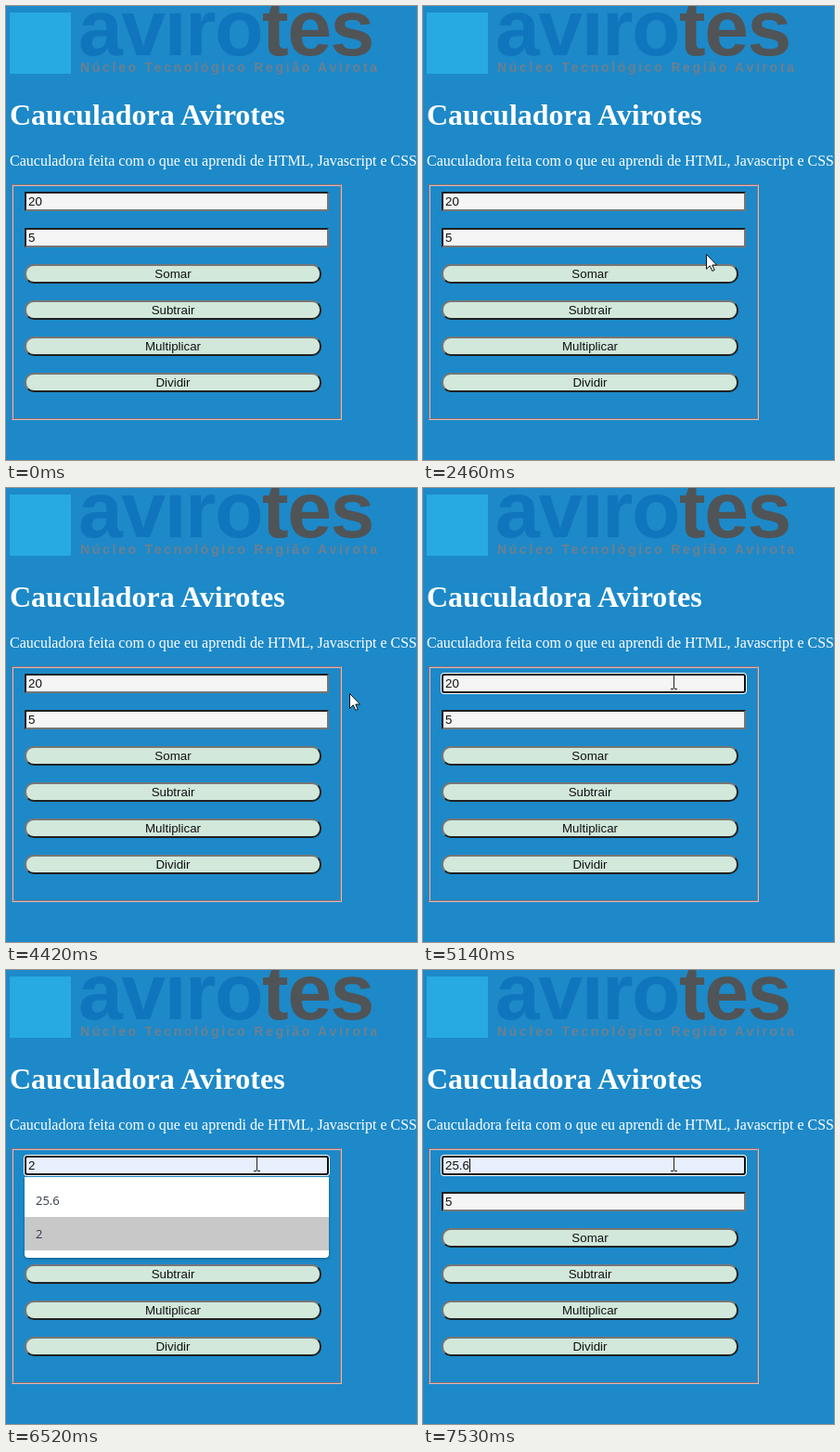
An HTML page that plays this animation: 443 px wide and 489 px high, repeating every 8 s.

```html
<!DOCTYPE html>
<html lang="pt">
<head>
<meta charset="utf-8">
<title>Cauculadora</title>
<style>
  html, body { margin: 0; width: 100%; height: 100%; overflow: hidden; background: #1d89c8; }
  #stage { position: relative; width: 443px; height: 489px; overflow: hidden; background: #1d89c8; }
  #stage div, #stage svg { position: absolute; box-sizing: border-box; white-space: pre; }
  .badge { left: 4px; top: 7px; width: 66px; height: 66px; background: #27a9e1; }
  .brand { left: 78px; top: -25px; color: #0f76bd; letter-spacing: -1.5px;
    font: bold 86px/96px "Liberation Sans", Arial, sans-serif; }
  .brand span { color: #505456; }
  .tagline { left: 80px; top: 58px; color: #6d7f8f; letter-spacing: 2.7px;
    font: bold 14px/17px "Liberation Sans", Arial, sans-serif; }
  .title { left: 4px; top: 99px; color: #fff; font: bold 32px/36px "Liberation Serif", "Times New Roman", serif; }
  .intro { left: 4px; top: 158px; color: #fff; font: 16px/18px "Liberation Serif", "Times New Roman", serif; }
  .form { left: 6px; top: 192px; width: 356px; height: 254px; border: 2px groove #e0b8bc; }
  .field, .button { left: 20px; height: 21px; color: #111;
    font: 13.333px/15px "Liberation Sans", Arial, sans-serif; }
  .field { width: 328px; padding: 1px 2px; border: 2px inset #767676; background: #f5f5f5; }
  .field.focus { border: 2px solid #101010; border-radius: 3px; box-shadow: 0 0 0 1px #fff; }
  .field.filled { background: #e8f0fe; }
  .button { width: 320px; padding: 1px; border: 2px outset #767676; border-radius: 10px;
    background: #d1e8db; text-align: center; }
  #caret { top: 203px; width: 1px; height: 15px; background: #000; }
  #menu { left: 20px; top: 223px; width: 328px; height: 87px; padding-top: 7px; background: #fff;
    border-radius: 0 0 4px 4px; box-shadow: 0 1px 3px rgba(0, 0, 0, .35); }
  #menu div { position: static; height: 36px; padding-left: 12px; color: #333a48;
    font: 13px/36px "Open Sans", "Noto Sans", sans-serif; }
  #menu .active { background: #c8c8c8; }
  #stage svg { left: 0; top: 0; overflow: visible; }
</style>
</head>
<body>
<div id="stage">
  <div class="badge"></div>
  <div class="brand">aviro<span>tes</span></div>
  <div class="tagline">Núcleo Tecnológico Região Avirota</div>
  <div class="title">Cauculadora Avirotes</div>
  <div class="intro">Cauculadora feita com o que eu aprendi de HTML, Javascript e CSS</div>
  <div class="form"></div>
  <div class="field" id="first" style="top:200px">20</div>
  <div class="field" style="top:239px">5</div>
  <div class="button" style="top:278px">Somar</div>
  <div class="button" style="top:317px">Subtrair</div>
  <div class="button" style="top:356px">Multiplicar</div>
  <div class="button" style="top:395px">Dividir</div>
  <div id="menu"><div>25.6</div><div>2</div></div>
  <div id="caret"></div>
  <svg id="arrow" width="12" height="19">
    <path d="M.5 .5V16.3L4.3 12.8L6.8 18.4L9.2 17.4L6.8 12H11.6Z" fill="#fff" stroke="#111"/>
  </svg>
  <svg id="beam" width="7" height="16">
    <path d="M0 .5H3M4 .5H7M3.5 1V15M0 15.5H3M4 15.5H7" fill="none" stroke="#222"/>
  </svg>
</div>
<script>
const LOOP = 8000;
const byId = id => document.getElementById(id);
const [first, menu, caret, arrow, beam] = ["first", "menu", "caret", "arrow", "beam"].map(byId);

// Pointer moves: start, end, number of steps, points spread evenly over the move
const moves = [
  { from: 700, to: 1460, steps: 11,
    path: [[388, 478], [404, 425], [408, 358], [385, 290], [345, 235], [308, 208]] },
  { from: 1540, to: 1850, steps: 5, path: [[300, 204], [282, 203], [267, 215]] },
  { from: 2080, to: 2230, steps: 3, path: [[260, 222], [243, 229], [231, 233]] },
  { from: 2380, to: 2780, steps: 6,
    path: [[225, 246], [305, 267], [303, 320], [298, 380], [292, 445], [290, 500]] },
  { from: 3630, to: 4420, steps: 11,
    path: [[284, 466], [274, 340], [279, 250], [330, 212], [409, 236], [370, 221]] },
  { from: 4490, to: 4820, steps: 5, path: [[352, 214], [300, 206], [270, 209]] }
];

// Field state from each time on; caret is its x or 0, active is the marked menu row
const states = [
  { at: 0, text: "20" },
  { at: 4650, text: "20", focus: true, caret: 39 },
  { at: 5140, text: "20", focus: true },
  { at: 5670, text: "2", focus: true, caret: 31, open: true },
  { at: 6200, text: "2", focus: true, open: true },
  { at: 6520, text: "2", focus: true, open: true, filled: true, active: 1 },
  { at: 6970, text: "25.6", focus: true, open: true, filled: true, active: 0 },
  { at: 7530, text: "25.6", focus: true, filled: true, caret: 50 }
];

const show = (el, on) => { el.style.display = on ? "block" : "none"; };

function pointerAt(t) {
  const move = moves.filter(m => t >= m.from).pop();
  if (!move) return null;
  const { from, to, steps, path } = move;
  const last = steps - 1;
  const step = Math.min(last, Math.floor((t - from) / (to - from) * last + 1e-6));
  const pos = step / last * (path.length - 1);
  const i = Math.min(path.length - 2, Math.floor(pos));
  return path[i].map((v, axis) => Math.round(v + (path[i + 1][axis] - v) * (pos - i)));
}

function overField(x, y) {
  return x >= 20 && x < 348 && [200, 239].some(top => y >= top && y < top + 21);
}

function drawPointer(t) {
  const p = pointerAt(t);
  const text = p && overField(...p);
  show(arrow, p && !text);
  show(beam, text);
  if (!p) return;
  const [x, y] = p;
  arrow.style.transform = `translate(${x}px, ${y}px)`;
  beam.style.transform = `translate(${x - 3}px, ${y - 8}px)`;
}

function drawField(t) {
  const s = states.filter(state => t >= state.at).pop();
  if (first.textContent !== s.text) first.textContent = s.text;
  first.classList.toggle("focus", !!s.focus);
  first.classList.toggle("filled", !!s.filled);
  show(menu, s.open);
  [...menu.children].forEach((row, i) => row.classList.toggle("active", s.active === i));
  show(caret, s.caret);
  caret.style.left = `${s.caret || 0}px`;
}

const start = performance.now();
function frame() {
  const t = (performance.now() - start) % LOOP;
  drawField(t);
  drawPointer(t);
  requestAnimationFrame(frame);
}
frame();
</script>
</body>
</html>
```
